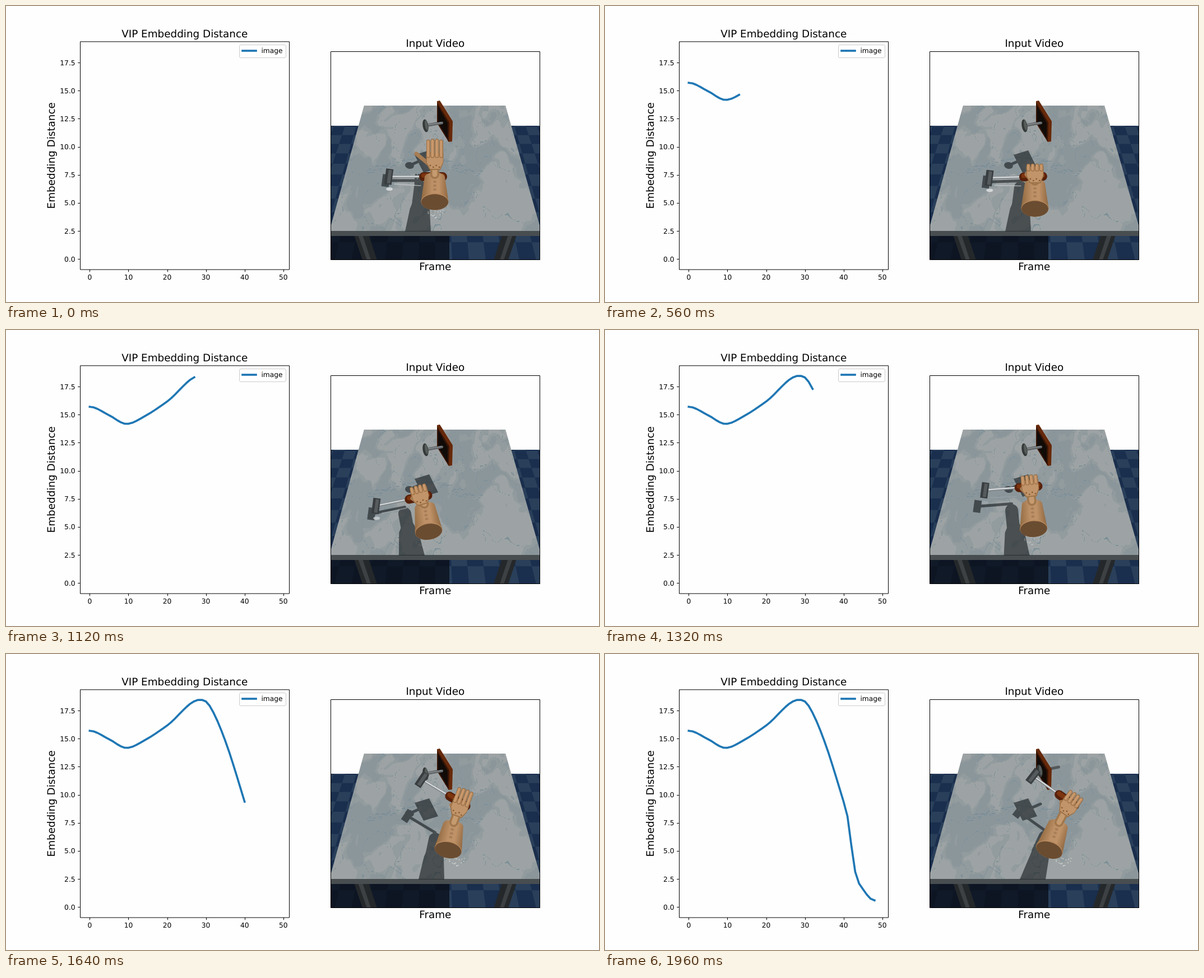
Recreate the animation shown at these times as an HTML page with a canvas. Size 1058 by 529 pixels, loop 3.2 s.

```html
<!DOCTYPE html>
<html lang="en">
<head>
<meta charset="utf-8">
<title>Embedding distance</title>
<style>
  html, body { margin: 0; width: 100%; height: 100%; overflow: hidden; background: #fefefe; }
  canvas, svg { position: absolute; display: block; }
  canvas { left: 580px; top: 82px; }
  svg { left: 0; top: 0; }
  text { font: 12.25px "DejaVu Sans", sans-serif; text-anchor: middle; text-rendering: geometricPrecision; }
  .big { font-size: 18.37px; }
  .axis { fill: none; stroke: #000; stroke-width: 1; }
  .curve { fill: none; stroke: #1f77b4; stroke-width: 3.66; stroke-linecap: square; stroke-linejoin: round; }
</style>
</head>
<body>
<canvas id="video" width="373" height="372"></canvas>
<svg width="1058" height="529" viewBox="0 0 1058 529">
  <text class="big" x="318.8" y="56">VIP Embedding Distance</text>
  <text class="big" x="765.8" y="73">Input Video</text>
  <text class="big" x="765.8" y="472">Frame</text>
  <text class="big" transform="translate(87 267.3) rotate(-90)">Embedding Distance</text>
  <g id="ticks"></g>
  <polyline id="curve" class="curve"/>
  <path class="axis" d="M132.5 63.8H505.5V471.1H132.5ZM579.5 81.5H952.5V453.5H579.5Z"/>
  <rect x="416.5" y="69.5" width="83" height="23" rx="2.5" fill="#fff" fill-opacity=".8" stroke="#ccc"/>
  <path class="curve" d="M422 80H446"/>
  <text x="474.5" y="84">image</text>
</svg>
<script>
const STEP = 40, LOOP = 3200, LAST = 49, TAU = Math.PI * 2;
const $ = id => document.getElementById(id);
const clamp = v => Math.min(1, Math.max(0, v));
const mix = (a, b, k) => a + (b - a) * k;

// Smooth curve through rows sorted by their first entry; flat at turning points
function spline(rows, col, x) {
  let i = 0;
  while (i < rows.length - 2 && x > rows[i + 1][0]) i++;
  const slope = j => {
    if (j < 1 || j > rows.length - 2) return 0;
    const [a, b, c] = [rows[j - 1], rows[j], rows[j + 1]];
    return (b[col] - a[col]) * (c[col] - b[col]) <= 0 ? 0 : (c[col] - a[col]) / (c[0] - a[0]);
  };
  const [a, b] = [rows[i], rows[i + 1]], h = b[0] - a[0], k = (x - a[0]) / h, q = 1 - k;
  return a[col] * (1 + 2 * k) * q * q + b[col] * (1 + 2 * q) * k * k +
    h * k * q * (slope(i) * q - slope(i + 1) * k);
}

// Chart
const px = v => 149.4 + 6.907 * v, py = v => 452.3 - 20.03 * v;
const bends = [[0, 15.73], [5, 14.98], [9.5, 14.2], [14, 14.85], [20, 16.2], [28.5, 18.5],
  [31, 17.95], [35, 14.85], [40, 9.4], [41, 8.1], [43, 3.15], [45, 1.6], [48, .6]];
const points = Array.from({ length: LAST }, (_, x) =>
  px(x).toFixed(1) + ',' + py(spline(bends, 1, x)).toFixed(1));

let ticks = '';
for (let v = 0; v <= 50; v += 10) {
  ticks += `<path class="axis" d="M${Math.round(px(v)) + .5} 471v4.3"/><text x="${px(v)}" y="489.4">${v}</text>`;
}
for (let v = 0; v < 20; v += 2.5) {
  ticks += `<path class="axis" d="M132.5 ${Math.floor(py(v)) + .5}h-4.3"/>` +
    `<text x="123.6" y="${py(v) + 4.3}" style="text-anchor:end">${v.toFixed(1)}</text>`;
}
$('ticks').innerHTML = ticks;

// Drawing helpers, all in stage coordinates
function layer(canvas) {
  canvas.width = 373;
  canvas.height = 372;
  const c = canvas.getContext('2d');
  c.translate(-580, -82);
  c.lineCap = c.lineJoin = 'round';
  return c;
}
function trace(c, pts) {
  c.beginPath();
  pts.forEach(p => c.lineTo(p[0], p[1]));
}
function poly(c, color, ...pts) {
  trace(c, pts);
  c.closePath();
  c.fillStyle = color;
  c.fill();
}
function line(c, color, width, ...pts) {
  trace(c, pts);
  c.strokeStyle = color;
  c.lineWidth = width;
  c.stroke();
}
function oval(c, color, x, y, rx, ry, rot = 0) {
  c.beginPath();
  c.ellipse(x, y, rx, ry, rot, 0, TAU);
  c.fillStyle = color;
  c.fill();
}
const rnd = (x, y) => {
  const s = Math.sin(x * 127.1 + y * 311.7) * 43758.5453;
  return s - Math.floor(s);
};
function noise(x, y) {
  const i = Math.floor(x), j = Math.floor(y), soft = k => k * k * (3 - 2 * k);
  const u = soft(x - i), v = soft(y - j);
  return mix(mix(rnd(i, j), rnd(i + 1, j), u), mix(rnd(i, j + 1), rnd(i + 1, j + 1), u), v);
}
const fbm = (x, y) => noise(x, y) * .6 + noise(x * 2.1 + 9, y * 2.1) * .28 + noise(x * 4.3, y * 4.3 + 5) * .12;

const view = layer($('video'));
const roomCanvas = document.createElement('canvas'), room = layer(roomCanvas);
const shadeCanvas = document.createElement('canvas'), shade = layer(shadeCanvas);
const table = [[639, 178], [891, 178], [955, 403], [577, 403]];

function drawFloor(c) {
  const vy = -277, row = k => vy + 1 / (1 / 730 + k * 6e-5);
  poly(c, '#1a2e4d', [580, 214], [953, 214], [953, 454], [580, 454]);
  c.save();
  c.beginPath();
  c.rect(580, 214, 373, 240);
  c.clip();
  for (let k = 0; row(k) > 214; k++) {
    for (let i = -10; i < 10; i++) {
      if ((i + k) & 1) continue;
      const at = (m, y) => [766 + m * .041 * (y - vy), y];
      const y0 = row(k), y1 = row(k + 1);
      poly(c, '#293f5a', at(i, y0), at(i + 1, y0), at(i + 1, y1), at(i, y1));
    }
  }
  poly(c, 'rgba(8,12,22,.75)', [580, 403], [791, 403], [791, 454], [580, 454]);
  c.restore();
}
function drawTable(c) {
  for (const side of [-1, 1]) {
    const leg = (a, b, d, e) => [[a, 409], [b, 409], [d, 454], [e, 454]].map(p => [766 + side * p[0], p[1]]);
    poly(c, '#25282a', ...leg(145, 119, 104, 130));
    poly(c, '#3d4143', ...leg(138, 130, 115, 122));
  }
  poly(c, '#919a9d', ...table);
  c.save();
  trace(c, table);
  c.clip();
  for (let y = 178; y < 403; y += 2) {
    const depth = 1 / (y + 277), v = 9000 * depth;
    for (let x = 580; x < 953; x++) {
      const u = (x - 766) * depth * 19;
      const w = fbm(u * .8 + 30, v * .8), n = fbm(u + w * 2 + 7, v + w * 2);
      const vein = Math.abs(fbm(u * .9 + 50, v * .9 + u * .3) - .5) < .004;
      c.fillStyle = vein ? '#7d9098' : n > .53 ? '#9da3a4' : n > .42 ? '#929b9e' : '#8b969b';
      c.fillRect(x, y, 1, 2);
    }
  }
  // bluish crack across the middle
  c.fillStyle = '#728a95';
  for (let i = 0; i < 60; i++) {
    const x = 645 + i * 3.4;
    const y = 262 + Math.abs(x - 740) * .36 + 12 * (rnd(i, 3) - .5);
    c.fillRect(x, y, 2 + 4 * rnd(i, 1), 1.2);
  }
  c.restore();
  poly(c, '#484d50', [580, 402], [953, 402], [953, 411], [580, 411]);
}
room.fillStyle = '#fefefe';
room.fillRect(580, 82, 373, 372);
drawFloor(room);
drawTable(room);

// Key poses: step, arm x, palm x, palm y, hammer angle, hammer height, finger reach
const poses = [
  [0, 765, 765, 276, 0, 7, 24],
  [14, 767, 767, 300, -.03, 7, 3],
  [28, 754, 739, 296, -.2, 14, 4],
  [37, 778, 784, 273, .13, 45, 12],
  [41, 789, 809, 274, .54, 65, 20],
  [49, 793, 827, 272, .62, 64, 12]
];
function poseAt(n) {
  const [capX, palmX, palmY, swing, lift, reach] = [1, 2, 3, 4, 5, 6].map(col => spline(poses, col, n));
  const lean = palmX - capX, open = clamp(1 - n / 12), raised = Math.max(open, clamp((lift - 8) / 37));
  const capY = 361 - 12 * raised;
  const cos = Math.cos(swing), sin = Math.sin(swing);
  const midX = palmX - 3, midY = palmY + 7 - lift * .28 + 24 * open;
  const along = d => [midX + d * cos, midY + d * sin];
  return {
    cap: [capX, capY], top: [capX + lean * .5, capY - 48], palm: [palmX, palmY],
    head: along(8 * Math.abs(swing) - 79), grip: along(-17), end: along(17),
    turn: lean * .018, tilt: .13 + Math.max(0, swing) * .85,
    lean, open, raised, swing, lift, reach,
    nail: clamp((n - 42) / 4)
  };
}

function hammerHead(c, color, [x, y], tilt, half, width) {
  const dx = -Math.sin(tilt) * half, dy = Math.cos(tilt) * half;
  c.lineCap = 'butt';
  line(c, color, width, [x - dx, y - dy], [x + dx, y + dy]);
  c.lineCap = 'round';
}
function drawShadows(p) {
  const c = shade, ink = '#171c1f', cast = ([x, y]) => [x - 3 - p.lift * .35, y + p.lift];
  c.clearRect(580, 82, 373, 372);
  poly(c, ink, [729, 266], [755, 258], [771, 290], [745, 298]);
  const nx = 720 + 30 * p.nail, ny = 285 - 5 * p.nail;
  line(c, ink, 5, [nx, ny], [nx + 27, ny - 12]);
  oval(c, ink, nx, ny, 8 - 3 * p.nail, 6, .2);

  const head = cast(p.head), grip = cast(p.grip), foot = p.cap[0] - 30;
  const [gx, gy] = [grip[0] - 3, grip[1] + 6], mid = (foot + gx) / 2;
  poly(c, ink, [foot - 23, 403], [foot + 23, 403], [mid + 20, 362], [mid + 10, 345], [mid - 10, 350], [mid - 15, 362]);
  line(c, ink, 23, [mid, 354], [gx + 3, gy + 6]);
  line(c, ink, 5, head, grip);
  hammerHead(c, ink, head, p.tilt, 11, 13);
  for (let i = 0; i < 3 && p.open > .4; i++) line(c, ink, 4, [gx - 6 + i * 6, gy], [gx - 5 + i * 5, gy - 16]);

  view.save();
  trace(view, table);
  view.clip();
  view.globalAlpha = .62;
  view.drawImage(shadeCanvas, 580, 82);
  view.restore();
}
function drawGlints(c, p) {
  const [x, y] = p.head, [gx, gy] = p.grip;
  c.globalAlpha = clamp(1.2 - p.lift / 30) * .85;
  oval(c, '#dfe2e3', x + 1, y + 22, 6, 3);
  line(c, '#c9cfd1', 1.2, [x + 10, y + 13], [gx - 5, gy + 16]);
  c.globalAlpha = p.raised * .8;
  c.fillStyle = '#e6eaea';
  for (let i = 0; i < 16; i++) {
    c.fillRect(p.cap[0] + p.lean * .7 + (rnd(i, 20) - .5) * 28, p.cap[1] + 22 + (rnd(i, 40) - .5) * 14, 1.6, 1.4);
  }
  c.globalAlpha = 1;
}
function drawBoard(c, d) {
  const x = 748.5 + 27 * d, y = 214 - 5 * d;
  line(c, '#55595a', 5, [x, y], [x + 34, y - 7]);
  poly(c, '#66290a', [769, 170], [774, 169], [797, 206], [796, 242], [790, 243], [769, 209]);
  poly(c, '#371506', [769, 172], [791, 208], [790, 243], [769, 209]);
  poly(c, '#110b08', [771, 179], [788, 209], [788, 237], [771, 208]);
  line(c, '#63676a', 4.5, [x, y], [Math.max(x, 778), 209]);
  line(c, '#888d8f', 1.5, [x, y - 1], [Math.max(x, 777), 208]);
  oval(c, '#343938', x, y, 5, 11.5, -.16);
  oval(c, '#575d5b', x + 1.5, y - 1, 2.5, 9, -.16);
}
function drawHammer(c, p) {
  const lower = ([x, y], d) => [x, y + d];
  line(c, '#7f8588', 4.5, p.head, p.grip);
  line(c, '#d9dddf', 2.2, lower(p.head, -.5), lower(p.grip, -.5));
  hammerHead(c, '#393d3f', p.head, p.tilt, 14, 13);
  hammerHead(c, '#565b5d', [p.head[0] + 1, p.head[1]], p.tilt, 12, 6);
  line(c, '#57200a', 16, p.grip, p.end);
  line(c, '#7d350f', 8, lower(p.grip, -2), lower(p.end, -2));
}
function drawArm(c, p) {
  const dx = p.cap[0] - p.top[0], dy = p.cap[1] - p.top[1], len = Math.hypot(dx, dy);
  c.save();
  c.translate(...p.top);
  c.rotate(Math.atan2(-dx, dy));
  const skin = c.createLinearGradient(-25, 0, 25, 0);
  skin.addColorStop(0, '#8f683f');
  skin.addColorStop(.4, '#bd9067');
  skin.addColorStop(.65, '#bf9268');
  skin.addColorStop(1, '#8d653e');
  c.beginPath();
  c.moveTo(-24.5, len);
  c.lineTo(-18, 4);
  c.bezierCurveTo(-15, -6, 15, -6, 18, 4);
  c.lineTo(24.5, len);
  c.ellipse(0, len, 24.5, 15.5, 0, 0, Math.PI);
  c.fillStyle = skin;
  c.fill();
  oval(c, '#b98b5e', 0, len + .5, 24.5, 15);
  oval(c, '#6a4c31', 0, len + 1.5, 24, 14.2);
  for (let i = 0; i < 3; i++) oval(c, 'rgba(100,70,42,.25)', 0, 13 + i * 7, 3, 2);
  c.restore();
}
function drawHand(c, p) {
  const tip = '#c9996d', edge = '#80592f', [x, y] = p.palm;
  const wrist = [x - Math.sin(p.turn) * 13, y + Math.cos(p.turn) * 13];
  line(c, '#a0774d', 16, p.top, wrist);
  line(c, '#c69a6f', 9, p.top, wrist);
  c.save();
  c.translate(x, y);
  c.rotate(p.turn);
  line(c, '#a87d53', 7, [-10, 7], [mix(-15, -33, p.open), mix(1, -12, p.open)]);
  poly(c, '#9c7349', [-15.5, -13], [15.5, -13], [15.5, 4], [10, 17], [-9, 17], [-15.5, 5]);
  poly(c, '#c2946a', [-14, -13], [14.5, -13], [14.5, 3], [9, 15], [-8, 15], [-14, 4]);
  for (let i = 0; i < 4; i++) {
    const fx = -11.5 + i * 7.7, end = -12 - p.reach * (1 - .06 * Math.abs(i - 1.5));
    line(c, edge, 7, [fx, -8], [fx, end]);
    line(c, '#b3865b', 6, [fx, -8], [fx, end]);
    line(c, tip, 3.6, [fx - .5, -8], [fx - .5, end]);
    oval(c, edge, fx * .7, 9 + (i & 1) * 3, 1.4, 1.2);
  }
  c.restore();
}

function draw(n) {
  $('curve').setAttribute('points', n > 1 ? points.slice(0, n).join(' ') : '');
  const p = poseAt(n);
  view.drawImage(roomCanvas, 580, 82);
  drawShadows(p);
  drawGlints(view, p);
  drawBoard(view, p.nail);
  drawHammer(view, p);
  drawArm(view, p);
  drawHand(view, p);
}
let shown = -1;
function tick() {
  const n = Math.min(LAST, Math.floor(performance.now() % LOOP / STEP));
  if (n !== shown) draw(shown = n);
  requestAnimationFrame(tick);
}
tick();
</script>
</body>
</html>
```
